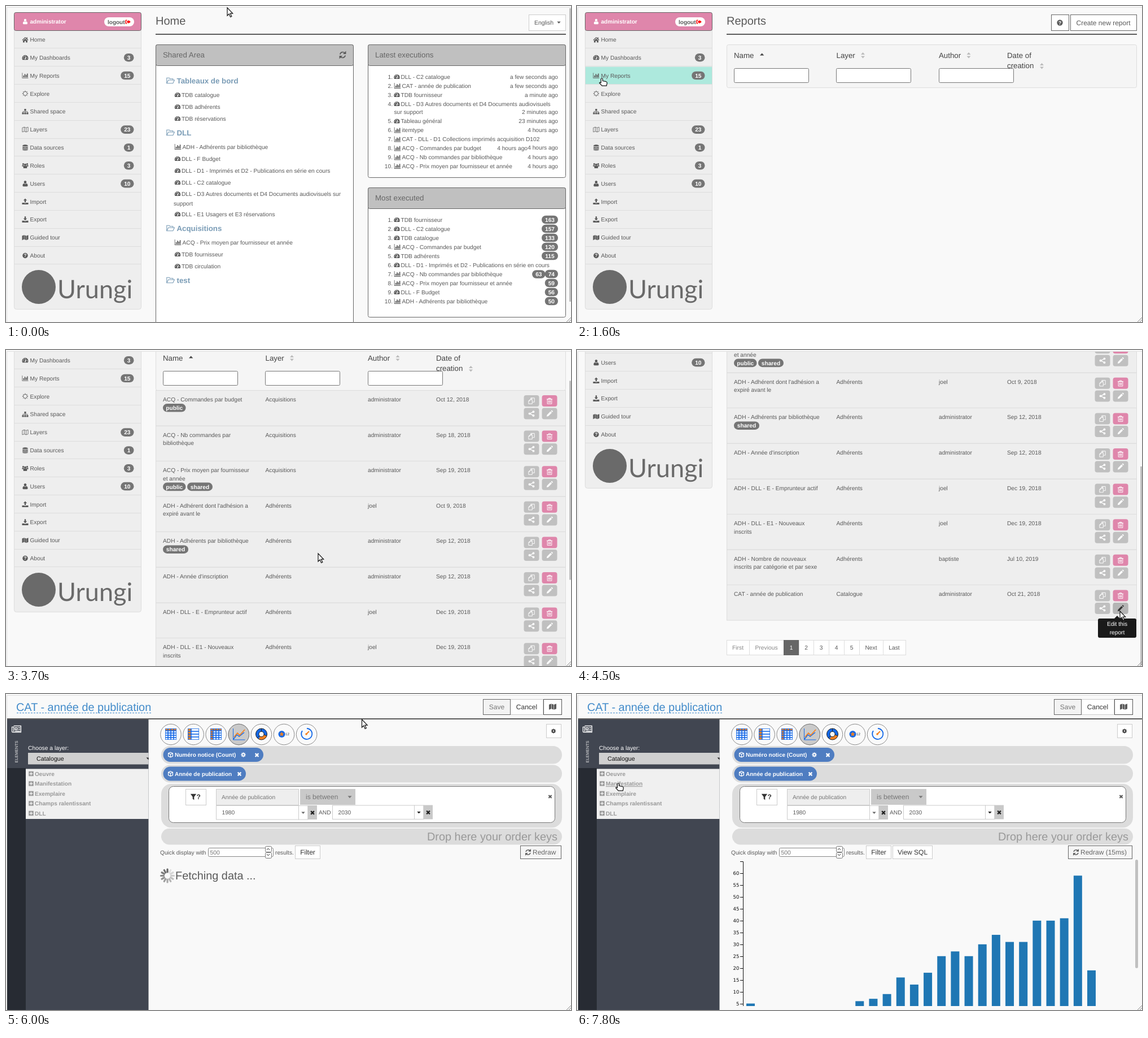
These frames come from a looping animation (1001 px wide and 559 px high, 8000 ms). An HTML page:

```html
<!DOCTYPE html>
<html lang="en">
<head>
<meta charset="utf-8">
<title>Report editor tour</title>
<style>
html, body { margin: 0; width: 100%; height: 100%; overflow: hidden; background: #f9f9f9; }
svg { display: block; width: 100%; height: 100%; }
text { font-family: "Liberation Sans", Arial, sans-serif; text-rendering: geometricPrecision; white-space: pre; }
</style>
</head>
<body>
<script>
const INK = '#5a5a5a', PINK = '#df86ab', GREY = '#c0c0c0', BLUE = '#1368e8', ORANGE = '#f5811f';
const BOLD = ' font-weight="700"', MID = ' text-anchor="middle"', END = ' text-anchor="end"';

// Icons on a 14 by 14 grid: a string is filled, [width, path] is stroked.
const TRAY = 'M0 9.500h4.500l1 1h3l1-1H14v4H0z';
const ICONS = {
  user: 'M7 .5a3 3.200 0 0 1 0 6.400a3 3.200 0 0 1 0-6.400zM3 13.500q-2 0-1.800-2.500 .3-4 2.800-4.300 3 2 6 0 2.500 .3 2.800 4.300 .2 2.500-1.800 2.500z',
  home: 'M7 1.500L0 8l1 1 6-5.500 6 5.500 1-1-2-2V2h-2v2zM2 9.500L7 5l5 4.500v4H8.500V10h-3v3.500H2z',
  dash: 'M0 8.500a7 7 0 0 1 14 0q0 2-1 3.800H1q-1-1.800-1-3.800zM1.800 7.500v1.600h1.600v-1.600zM3 4v1.600h1.600v-1.600zM6.200 2.600v1.600h1.600v-1.600zM10.600 7.500v1.600h1.600v-1.600zM8.200 4.800L6.300 8.500q-1.300 1.500 0 2.500 2 .8 2-1.200L9.500 5z',
  bars: 'M0 1h1v11h13v1H0zM2.500 7h2v4h-2zM5.300 3.500h2V11h-2zM8.200 5.500h2V11h-2zM11 2.500h2V11h-2z',
  sun: [1.2, 'M7 2.500a4.500 4.500 0 0 1 0 9a4.500 4.500 0 0 1 0-9M7 .3v1.500M7 12.200v1.500M.3 7h1.500M12.200 7h1.500M2.200 2.200l1 1M10.800 10.800l1 1M2.200 11.800l1-1M10.800 3.200l1-1'],
  tree: 'M5 1h4v4H5zM0 9h4v4H0zM5 9h4v4H5zM10 9h4v4h-4zM1.500 6.500h11V9h-1V7.500h-9V9h-1zM6.500 5h1v4h-1z',
  mapo: [1, 'M.5 3L5 1.500 9 3l4.500-1.500V11L9 12.500 5 11 .5 12.500zM5 1.500V11M9 3v9.500'],
  map: 'M0 3l4.300-1.700V11L0 12.700zM5 1.300L9 3v9.700L5 11zM9.700 3L14 1.300V11l-4.300 1.700z',
  db: 'M1 2q6-3 12 0v1.500q-6 2-12 0zM1 5q6 2 12 0v2q-6 2-12 0zM1 8.200q6 2 12 0v2q-6 2-12 0zM1 11.300q6 2 12 0v1.200q-6 2.500-12 0z',
  users: 'M7 2.500a2.500 2.500 0 0 1 0 5a2.500 2.500 0 0 1 0-5zM3 13q-1-5 1.500-5.500h5Q12 8 11 13zM2.500 1.500a2 2 0 0 1 0 4a2 2 0 0 1 0-4zM11.500 1.500a2 2 0 0 1 0 4a2 2 0 0 1 0-4zM0 9V6h4v2L2.500 9zM14 9V6h-4v2l1.500 1z',
  up: 'M7 0l4 4.500H8.500V9h-3V4.500H3z' + TRAY,
  down: 'M7 9L3 4.500h2.500V0h3v4.500H11z' + TRAY,
  disc: 'M7 1a6 6 0 0 1 0 12a6 6 0 0 1 0-12z',
  folder: [1, 'M.7 11V2.500H5L6 4h5v2M.7 11.500L3.500 6h10L11 11.500z'],
  refresh: [1.8, 'M2 6a5.200 5.200 0 0 1 9.500-2M12 8a5.200 5.200 0 0 1-9.500 2M12.500 1.500v3H9.500zM1.500 12.500v-3h3z'],
  out: 'M5 2H2.500Q.5 2 .5 4v6q0 2 2 2H5v-1.700H2.500V3.700H5zM8 2.500L13.800 7 8 11.500V9H4.500V5H8z',
  copy: [1.1, 'M5.500 4V1H13v8.500H9M3.500 4.500h5V13H1V7zM3.500 4.500V7H1M8 1v2.500H5.500'],
  trash: [1.1, 'M2.500 3.500h9V13h-9zM1 3.500h12M5 3.500v-2h4v2M5 6v5M7 6v5M9 6v5'],
  share: 'M11 .7a2.300 2.300 0 0 1 0 4.600a2.300 2.300 0 0 1 0-4.600zM3 4.700a2.300 2.300 0 0 1 0 4.600a2.300 2.300 0 0 1 0-4.600zM11 8.700a2.300 2.300 0 0 1 0 4.600a2.300 2.300 0 0 1 0-4.600zM3 6.300l8-4 .7 1.400L5 7l6.700 3.300-.7 1.400-8-4z',
  pencil: 'M1 13l.8-3.500L9 2.300 11.700 5l-7.200 7.200zM10 1.300l1-1h1L13.700 2v1l-1 1z',
  news: [1.1, 'M3 2.500h10.500v9H1.500q-1 0-1-1V4H3v6.500M5 5h3v3H5zM9.500 5h3M9.500 7.500h3M5 10h7.500'],
  cog: [2.3, 'M7 4a3 3 0 0 1 0 6a3 3 0 0 1 0-6M7 1v2M7 11v2M1 7h2M11 7h2M2.800 2.800l1.400 1.400M9.800 9.800l1.400 1.400M2.800 11.200l1.400-1.400M9.800 4.200l1.400-1.400'],
  cube: [1.7, 'M7 1l5.500 2.500v7L7 13l-5.500-2.500v-7zM1.500 3.500L7 6l5.500-2.500M7 6v7'],
  times: [3.2, 'M3 3l8 8M11 3l-8 8'],
  plus: 'M1 1h12v12H1zM6 3v3H3v2h3v3h2V8h3V6H8V3z',
  filter: 'M1 1h12L8.500 7v6.500L5.500 11V7z',
  caret: 'M2 4.500h10L7 10z'
};

const P = (d, stroke, w = 1, fill = 'none') => `<path d="${d}" stroke="${stroke}" stroke-width="${w}" fill="${fill}"/>`;
const C = (x, y, r, fill, stroke = 'none', w = 1, more = '') =>
  `<circle cx="${x}" cy="${y}" r="${r}" fill="${fill}" stroke="${stroke}" stroke-width="${w}" ${more}/>`;
const R = (x, y, w, h, fill, stroke, r = 0, more = '') => {
  const o = stroke ? .5 : 0;
  return `<rect x="${x + o}" y="${y + o}" width="${w}" height="${h}" rx="${r}" fill="${fill}" stroke="${stroke || 'none'}" ${more}/>`;
};
// Text is placed by the middle of its capitals.
const T = (x, y, s, fill = INK, size = 10.2, more = '') =>
  `<text x="${x}" y="${y + size * .36}" font-size="${size}" fill="${fill}"${more}>${s}</text>`;
const icon = (name, x, y, size = 11, color = INK) => {
  const d = ICONS[name], k = size / 14;
  return `<g transform="translate(${x - size / 2} ${y - size / 2}) scale(${k})">` +
    (Array.isArray(d) ? P(d[1], color, d[0]) : P(d, 'none', 0, color)) + '</g>';
};
const help = (x, y, size) => icon('disc', x, y, size) + T(x, y, '?', '#fff', size * .75, BOLD + MID);
const badge = (right, y, s, w = 5.67 * s.length + 12) =>
  R(right - w, y - 7.3, w, 14.6, '#757575', 0, 7.3) + T(right - w / 2, y, s, '#fff', 10.2, BOLD + MID);
const each = (list, f) => list.map(f).join('');
const scene = (from, to, ...parts) => `<g data-t="${from} ${to}">${parts.join('')}</g>`;

// Sidebar
const TOP = 43.4, STEP = 31.85;
const MENU = [['home', 'Home'], ['dash', 'My Dashboards', '3'], ['bars', 'My Reports', '15'], ['sun', 'Explore'],
  ['tree', 'Shared space'], ['mapo', 'Layers', '23'], ['db', 'Data sources', '1'], ['users', 'Roles', '3'],
  ['user', 'Users', '10'], ['up', 'Import'], ['down', 'Export'], ['map', 'Guided tour'], ['', 'About']];
const sidebar = R(14, 11, 225, 525, '#eee', '#ddd', 4) +
  R(15, 0, 224, STEP - 1, '#ade9dd', 0, 0, 'id="hover"') +
  each(MENU, ([name, label, n], i) => {
    const y = TOP + STEP * (i + .5);
    return (name ? icon(name, 34, y, 11) : help(34, y, 11)) + T(42.5, y, label) + (n ? badge(226.5, y, n) : '') +
      P(`M15 ${Math.round(y + STEP / 2) - .5}h224`, '#ddd');
  }) +
  R(14, 11, 225, 32, PINK, '#666', 3) + icon('user', 34, 27.5, 10, '#fff') +
  T(42.5, 27.5, 'administrator', '#fff', 10.05, BOLD) + R(174, 20, 53, 16, '#fff', 0, 8) +
  T(180, 28, 'logout', INK, 10, BOLD) + icon('out', 216, 28, 10, '#f00') +
  C(58, 497, 30, '#6a6a6a') +
  T(91, 501, 'Urungi', '#6a6a6a', 45, ' style="font-family:Lato,sans-serif"');

const heading = s => T(265, 26, s, INK, 20) + R(265, 49, 727, 2, '#5c5c5c');

// Home page
const panel = (x, y, h, title) => R(x, y, 350, h, '#fff', '#666', 3) + R(x, y, 350, 37, GREY, '#666', 3) +
  T(x + 13, y + 18.5, title, '#666', 13.3);
const entry = (x, y, s, tag) => {
  const bars = tag === 'b';
  return icon(bars ? 'bars' : 'dash', x + (bars ? 6 : 5), y, bars ? 11.5 : 10.5) + T(x + (bars ? 14 : 12), y, s);
};
const SHARED = [[157, 'TDB catalogue'], [178, 'TDB adhérents'], [199, 'TDB réservations'],
  [249, 'ADH - Adhérents par bibliothèque', 'b'], [270, 'DLL - F Budget'],
  [291, 'DLL - D1 - Imprimés et D2 - Publications en série en cours'], [312, 'DLL - C2 catalogue'],
  [332, 'DLL - D3 Autres documents et D4 Documents audiovisuels sur'], [368, 'DLL - E1 Usagers et E3 réservations'],
  [418, 'ACQ - Prix moyen par fournisseur et année', 'b'], [439, 'TDB fournisseur'], [460, 'TDB circulation']];
const LATEST = [[125, 'DLL - C2 catalogue', '', 'a few seconds ago'], [141, 'CAT - année de publication', 'b', 'a few seconds ago'],
  [157, 'TDB fournisseur', '', 'a minute ago'], [173, 'DLL - D3 Autres documents et D4 Documents audiovisuels', '', ''],
  [203.5, 'Tableau général', '', '23 minutes ago'], [219.5, 'itemtype', 'b', '4 hours ago'],
  [235.500, 'CAT - DLL - D1 Collections imprimés acquisition D102', 'b', ''], [251.500, 'ACQ - Commandes par budget', 'b', ''],
  [267.500, 'ACQ - Nb commandes par bibliothèque', 'b', '4 hours ago'], [283, 'ACQ - Prix moyen par fournisseur et année', 'b', '4 hours ago']];
const MOST = [['TDB fournisseur', '', '163'], ['DLL - C2 catalogue', '', '157'], ['TDB catalogue', '', '133'],
  ['ACQ - Commandes par budget', 'b', '120'], ['TDB adhérents', '', '115'],
  ['DLL - D1 - Imprimés et D2 - Publications en série en cours', ''], ['ACQ - Nb commandes par bibliothèque', 'b', '74'],
  ['ACQ - Prix moyen par fournisseur et année', 'b', '59'], ['DLL - F Budget', '', '56'], ['ADH - Adhérents par bibliothèque', 'b', '50']];
const rank = (i, y, s, tag) => T(685, y, i + 1 + '.', INK, 10.2, END) + entry(687.500, y, s, tag);
const home = heading('Home') + R(926, 15, 65, 28, '#fff', '#ccc') + T(936, 29, 'English', INK, 10.4) + icon('caret', 979.500, 29, 9) +
  panel(265, 68, 520, 'Shared Area') + icon('refresh', 596.5, 86.5, 13) +
  each([[132, 'Tableaux de bord'], [224, 'DLL'], [393, 'Acquisitions'], [485, 'test']], ([y, s]) =>
    icon('folder', 291.5, y, 15, '#7a9cb6') + T(302.5, y, s, '#7a9cb6', 13.3, BOLD)) +
  each(SHARED, ([y, s, tag]) => entry(298 - (tag ? 1.5 : 0) + (tag ? 2 : 1), y, s, tag)) + T(297, 349, 'support') +
  panel(641, 68, 235, 'Latest executions') +
  each(LATEST, ([y, s, tag, ago], i) => rank(i, y, s, tag) + T(978, y, ago, INK, 10.2, END)) +
  T(687.5, 187, 'sur support') + T(978, 187, '2 minutes ago', INK, 10.2, END) +
  T(924, 251.5, '4 hours ago', INK, 10.2, END) + T(978, 250, '4 hours ago', INK, 10.2, END) +
  panel(641, 321, 229, 'Most executed') +
  each(MOST, ([s, tag, n], i) => rank(i, 378 + 16 * i, s, tag) + (n ? badge(978, 378 + 16 * i, n) : '')) + badge(955.5, 474.500, '63');

// Reports page
const ADMIN = 'administrator';
const ROWS = [['ACQ - Commandes par budget', 'Acquisitions', ADMIN, 'Oct 12, 2018', 'public'],
  ['ACQ - Nb commandes par|bibliothèque', 'Acquisitions', ADMIN, 'Sep 18, 2018'],
  ['ACQ - Prix moyen par fournisseur|et année', 'Acquisitions', ADMIN, 'Sep 19, 2018', 'public shared'],
  ["ADH - Adhérent dont l'adhésion a|expiré avant le", 'Adhérents', 'joel', 'Oct 9, 2018'],
  ['ADH - Adhérents par bibliothèque', 'Adhérents', ADMIN, 'Sep 12, 2018', 'shared'],
  ["ADH - Année d'inscription", 'Adhérents', ADMIN, 'Sep 12, 2018'],
  ['ADH - DLL - E - Emprunteur actif', 'Adhérents', 'joel', 'Dec 19, 2018'],
  ['ADH - DLL - E1 - Nouveaux|inscrits', 'Adhérents', 'joel', 'Dec 19, 2018'],
  ['ADH - Nombre de nouveaux|inscrits par catégorie et par sexe', 'Adhérents', 'baptiste', 'Jul 10, 2019'],
  ['CAT - année de publication', 'Catalogue', ADMIN, 'Oct 21, 2018']];
const tool = (name, x, y, fill = GREY, color = '#fff') => R(x - 13.5, y - 10, 27, 20, fill, 0, 4) + icon(name, x, y, 12, color);
const row = ([name, layer, author, date, tags = ''], i) => {
  const top = 144 + 62.6 * i, y = top + 16.3, lines = name.split('|');
  let x = 278;
  return R(265, Math.round(top), 726, 62.6, '#eee', '#ddd') + each(lines, (s, j) => T(278, y + 14.4 * j, s)) +
    T(459.5, y, layer) + T(641, y, author) + T(762, y, date) +
    each(tags.split(' ').filter(Boolean), s => {
      const w = s === 'public' ? 40.5 : 45;
      x += w + 2.500;
      return badge(x - 2.500, y + 15 + 14.4 * (lines.length - 1), s, w);
    }) +
    tool('copy', 931, top + 19) + tool('trash', 963, top + 19, PINK) + tool('share', 931, top + 41.6) + tool('pencil', 963, top + 41.6);
};
const sort = (x, y) => P(`M${x - 3.5} ${y - 1}l3.500-4 3.500 4zm0 2.500l3.500 4 3.500-4z`, 'none', 0, '#bbb');
const EDGES = [265, 305, 366, 393, 419, 446, 473, 500, 542, 582];
const pager = each(['First', 'Previous', '1', '2', '3', '4', '5', 'Next', 'Last'], (s, i) => {
  const x = EDGES[i], w = EDGES[i + 1] - x, on = s === '1';
  return R(x, 805, w, 26, on ? '#666' : '#fff', on ? '#666' : '#ddd') +
    T(x + w / 2, 818.5, s, on ? '#fff' : i < 2 ? '#888' : INK, 10.3, MID);
});
const reports = heading('Reports') + R(840, 15, 31, 28, '#fff', '#666') + help(855.5, 29.5, 12) +
  R(874, 15, 117, 28, '#fff', '#666') + T(884.5, 29.5, 'Create new report', INK, 12) +
  R(265, 68, 726, 76, '#f5f5f5', '#ddd', 3) +
  each([[278, 'Name'], [459.5, 'Layer'], [641, 'Author'], [762, 'Date of']], ([x, s]) => T(x, 87, s, '#444', 13.3)) +
  T(762, 105.5, 'creation', '#444', 13.3) + P('M324 87.500l3.700-4 3.700 4z', 'none', 0, '#444') +
  sort(506.500, 87) + sort(694, 87) + sort(823.5, 106) +
  each([278, 459, 641], x => R(x, 110, 132, 25, '#fff', '#777', 2)) +
  scene(1800, 4700, each(ROWS, row), pager) +
  scene(4500, 4700, tool('pencil', 963, 749, '#b4b4b4', '#333'), R(923, 767, 68, 34, '#1a1a1a', 0, 3),
    P('M952 767l5-5 5 5z', 'none', 0, '#1a1a1a'), T(957, 776.5, 'Edit this', '#fff', 10.2, MID), T(957, 791, 'report', '#fff', 10.2, MID));

// Explorer page
const bar = (y, h, s) => R(275, y, 710, h, '#dcdcdc', 0, Math.min(h / 2, 18)) + (s ? T(977, y + 14, s, '#999', 19.9, END) : '');
const button = (x, y, w, h, s, border = '#ccc', fill = '#fff', color = '#333') =>
  R(x, y, w, h, fill, border) + T(x + w / 2 + .5, y + h / 2 + .5, s, color, 12, MID);
const grid = (cx, xs, ys, head) => R(cx - 10, 61, 20, 20, BLUE) +
  each(xs.slice(1), (x, i) => each(ys.slice(1), (y, j) =>
    R(cx - 10 + xs[i] + .8, 61 + ys[j] + .8, x - xs[i] - 1.6, y - ys[j] - 1.6, head(i, j) ? ORANGE : '#fff')));
const Q = [0, 5, 10, 15, 20], F = [0, 4, 8, 12, 16, 20];
const disc = i => 292 + 40.1 * i;
const star = each([0, 1, 2, 3, 4, 5, 6, 7, 8, 9], i => {
  const a = Math.PI * i / 5, r = i % 2 ? 2 : 4.500;
  return (i ? 'L' : 'M') + (488.5 + r * Math.sin(a)) + ' ' + (71 - r * Math.cos(a));
});
const kinds = each([0, 1, 2, 3, 4, 5, 6], i => C(disc(i), 71.5, 18.3, '#fafafa', '#8a8a8a')) +
  scene(6000, 8000, C(disc(3), 71.5, 18.3, '#cacaca', '#777')) +
  grid(292, Q, F, (i, j) => !j) + grid(332, [0, 6, 20], Q, i => !i) + grid(372, Q, F, (i, j) => !i || !j) +
  P('M402.500 61v20h21', BLUE) + P('M403 80l6-8 4 3 9-7', BLUE, 1.5) + P('M404 76l6-7 4 4 9-10', ORANGE, 1.800) +
  C(452.5, 71, 7.3, 'none', BLUE, 5.4) + C(452.5, 71, 7.3, 'none', ORANGE, 5.4, 'stroke-dasharray="13 33" stroke-dashoffset="-2"') +
  C(452.5, 71, 10, 'none', '#222') + C(452.5, 71, 4.600, 'none', '#222') + P('M452.500 61v5M462 74l-5-2M445 78l4-4', '#222') +
  C(488.5, 71, 6, BLUE) + P(star + 'z', 'none', 0, ORANGE) + T(495, 71, '12', '#345', 6.2) +
  P('M525 65a9.500 9.500 0 1 0 8-4', BLUE, 1.800) + P('M532 71l5-5', ORANGE, 2) + C(532, 71, 1.800, ORANGE);

const pill = (y, w, s, ...more) => R(278.5, y - 12.5, w, 25, '#4f7dc1', 0, 12.5) + icon('cube', 291.5, y, 10, '#fff') +
  T(299, y, s, '#fff', 10, BOLD) + more.join('');
const FIELDS = ['Oeuvre', 'Manifestation', 'Exemplaire', 'Champs ralentissant', 'DLL'];
const field = i => icon('plus', 44.5, 141 + 17.5 * i, 10, '#999') + T(51, 141 + 17.5 * i, FIELDS[i], '#999', 10.1, BOLD + ' class="field"');
const left = R(2, 45, 33, 514, '#272b33') + R(35, 45, 217.5, 514, '#414651') + R(2, 45, 34, 86, '#414651') +
  icon('news', 18.5, 62, 17, '#fff') +
  `<g transform="translate(18 102) rotate(-90)">${T(0, 0, 'ELEMENTS', '#e4e4e4', 7.2, MID)}</g>` +
  scene(5600, 8000, T(39, 95, 'Choose a layer:', '#fff', 10.3), R(39, 104, 213.5, 20.5, '#d0d0d0'),
    T(54, 114.5, 'Catalogue', '#111', 10.7), P('M248.500 112.500h4v4z', 'none', 0, '#222'),
    R(35, 132.5, 217.5, 71, '#f0f0f0'), each([0, 1, 2, 3], field)) +
  scene(6000, 8000, R(35, 203, 217.5, 18, '#f0f0f0'), field(4));

const between = R(288, 163, 684, 64, '#fff', '#777', 8) + R(318, 168, 36, 28, '#fff', '#ccc') + icon('filter', 332, 182, 12, '#333') +
  T(337.5, 182, '?', '#333', 12, BOLD) + R(372, 168, 146, 28, '#eee', '#ccc') + T(382, 182, 'Année de publication', '#777') +
  R(521, 168, 98, 28, '#c9c9c9') + T(531, 182, 'is between', '#777', 12) + icon('caret', 609, 182, 10, '#777') + icon('times', 964, 181.5, 9) +
  each([[372, 197, '1980', '#666', 146], [578, 196.5, '2030', '#222', 145]], ([x, y, s, color, w]) =>
    R(x, y, w, 24.5, '#fff', '#ccc') + T(x + 10.5, y + 12.5, s) + R(x + w, y, 16.5, 24.5, '#fff', '#ccc') +
    icon('caret', x + w + 8.5, y + 13, 9, color) + R(x + w + 16.5, y, 16.5, 25, '#c9c9c9') + icon('times', x + w + 25, y + 13, 10, '#222')) +
  T(554, 209.5, 'AND');
const query = bar(92, 31.5) + bar(125.5, 31) + bar(159, 77.5) + bar(238, 28.5, 'Drop here your order keys') +
  pill(107.5, 177.5, 'Numéro notice (Count)', icon('cog', 420.5, 107.5, 10, '#fff'), icon('times', 444.5, 108, 10, '#fff')) +
  pill(141, 146.5, 'Année de publication', icon('times', 413.5, 141.5, 10, '#fff')) + between +
  T(273, 280, 'Quick display with') + R(358, 272, 115, 15, '#fff', '#888', 2) + T(361.5, 280, '500', '#777', 10.4) +
  R(459, 269, 11, 10, '#fff', '#777', 2) + R(459, 280, 11, 10, '#fff', '#777', 2) +
  P('M462 276l2.500-3 2.500 3M462 283l2.500 3 2.500-3', '#333') + T(477, 280, 'results.') +
  button(512, 268, 44, 23, 'Filter');

const spinner = each([0, 1, 2, 3, 4, 5, 6, 7, 8, 9, 10, 11], i =>
  `<path d="M0-6.500V-11.500" stroke-width="3.200" stroke-linecap="round" stroke="hsl(0 0% ${40 + 4.4 * i}%)" transform="translate(286 321.500) rotate(${-30 * i})"/>`);
const VALUES = [5, 0, 0, 0, 0, 0, 0, 0, 6, 7, 9, 16, 13, 18, 25, 27, 25, 30, 34, 31, 31, 40, 40, 41, 59, 19];
const level = v => 568.5 - 4.19 * v;
const chart = each(VALUES, (v, i) => v ? R(300 + 24.16 * i, level(v), 15, 552 - level(v), '#1f77b4') : '') +
  P('M289 296.500h5.500V552', '#111') +
  each([5, 10, 15, 20, 25, 30, 35, 40, 45, 50, 55, 60], v => P(`M289 ${Math.round(level(v)) + .5}h5.500`, '#111') +
    T(287.5, level(v), v, '#111', 8.6, END + ' style="font-family:\'DejaVu Sans\',sans-serif"')) +
  R(989, 293, 5, 192, GREY, 0, 2.5);
const redraw = (x, s) => R(x, 268, 983 - x, 23, '#f5f5f5', '#666') + icon('refresh', x + 14, 280, 11) + T(x + 22, 280, s, '#666', 12);

const explorer = R(2, 43, 999, 2, '#5c5c5c') + left + kinds + R(957, 53, 26, 24, '#fff', '#ccc') + icon('cog', 970, 65.5, 9.5, '#333') +
  button(893, 9, 58, 27, 'Cancel') +
  scene(4700, 6000, T(18, 22.5, 'Explorer', '#444', 19.9), R(952, 9, 32, 27, '#eee', '#555'),
    bar(92, 28, 'Drop here your filters'), bar(122, 29, 'Drop here your order keys')) +
  scene(6000, 8000, T(18, 22.5, 'CAT - année de publication', '#428bca', 19.9), P('M19 33.500h238', '#428bca', '1" stroke-dasharray="3 2'),
    button(845, 9, 48, 27, 'Save', '#666', '#f3f3f3', '#777'), R(952, 9, 32, 27, '#fff', '#555'), query) +
  icon('map', 968.5, 22.5, 13) +
  scene(6000, 6400, redraw(911, 'Redraw'), spinner, T(300, 321, 'Fetching data ...', INK, 19.9)) +
  scene(6400, 8000, button(559, 268, 70, 23, 'View SQL'), redraw(870, 'Redraw (15ms)'), chart);

document.body.innerHTML = `<svg viewBox="0 0 1001 559" preserveAspectRatio="none">${R(0, 0, 1001, 559, '#f9f9f9')}
  <g id="page">${scene(0, 4700, sidebar) + scene(0, 1600, home) + scene(1600, 4700, reports)}</g>` +
  scene(4700, 8000, explorer) + scene(0, 1600, R(998, 4, 3, 519, GREY)) +
  scene(1800, 4700, R(998, 4, 3, 352, GREY, 0, 0, 'id="thumb"')) +
  R(0, 0, 1001, 2, '#fafafa') + P('M1.500 559V2.500H1001', '#dedede') + P('M993 559l8-8M997 559l4-4', '#888') +
  `<g id="cursor">${P('M0 0V14l3.200-3 2.400 5.500 2.200-1-2.400-5.300h4.300z', '#111', 1.2, '#fff') +
  P('M-1.500 1.500Q0-1 1.500 1.500V5l6 1.200q2 .6 1.800 2.500l-1 5h-8l-4.500-5q0-2 2.700-.5z', '#111', 1.2, '#fff')}</g></svg>`;

// Each move: start time, number of 100 ms steps, end point.
const MOVES = [[200, 5, 44, 127.5], [1800, 7, 553, 360], [4000, 4, 962, 462], [4600, 5, 926, 372],
  [5200, 1, 813, 331], [5400, 1, 380, 147], [5600, 2, 630.5, 45], [7100, 8, 73, 157.5]];
const $ = id => document.getElementById(id);
const scenes = [...document.querySelectorAll('[data-t]')].map(el => [el, ...el.dataset.t.split(' ').map(Number)]);
const fields = document.querySelectorAll('.field');
const [arrow, hand] = $('cursor').children;
const show = (el, on) => el.style.display = on ? '' : 'none';
const ramp = (t, start, n) => Math.min(Math.max(Math.floor((t - start) / 100) + 1, 0), n) / n;
const ease = p => p * p * (3 - 2 * p);

function draw(t) {
  let x = 392, y = 3;
  for (const [start, n, x2, y2] of MOVES) {
    const p = ease(ramp(t, start, n));
    x += (x2 - x) * p;
    y += (y2 - y) * p;
  }
  for (const [el, from, to] of scenes) show(el, t >= from && t < to);
  const scroll = 292 * ramp(t, 3700, 4);
  $('page').setAttribute('transform', `translate(0 ${-scroll})`);
  $('thumb').setAttribute('y', 4 + scroll * 202 / 292);

  const item = Math.floor((y - TOP) / STEP);
  const onMenu = t < 3700 && x > 15 && x < 239 && item >= 0 && item < MENU.length;
  show($('hover'), onMenu);
  $('hover').setAttribute('y', TOP + STEP * item + .5);
  const line = t > 7000 && x > 51 && x < 116 ? Math.floor((y - 132.5) / 17.5) : -1;
  fields.forEach((el, i) => el.style.textDecoration = i === line ? 'underline' : 'none');

  $('cursor').setAttribute('transform', `translate(${x} ${y})`);
  show(hand, onMenu || line >= 0);
  show(arrow, !onMenu && line < 0);
}

const begin = performance.now();
function tick() {
  draw((performance.now() - begin) % 8000);
  requestAnimationFrame(tick);
}
tick();
</script>
</body>
</html>
```
